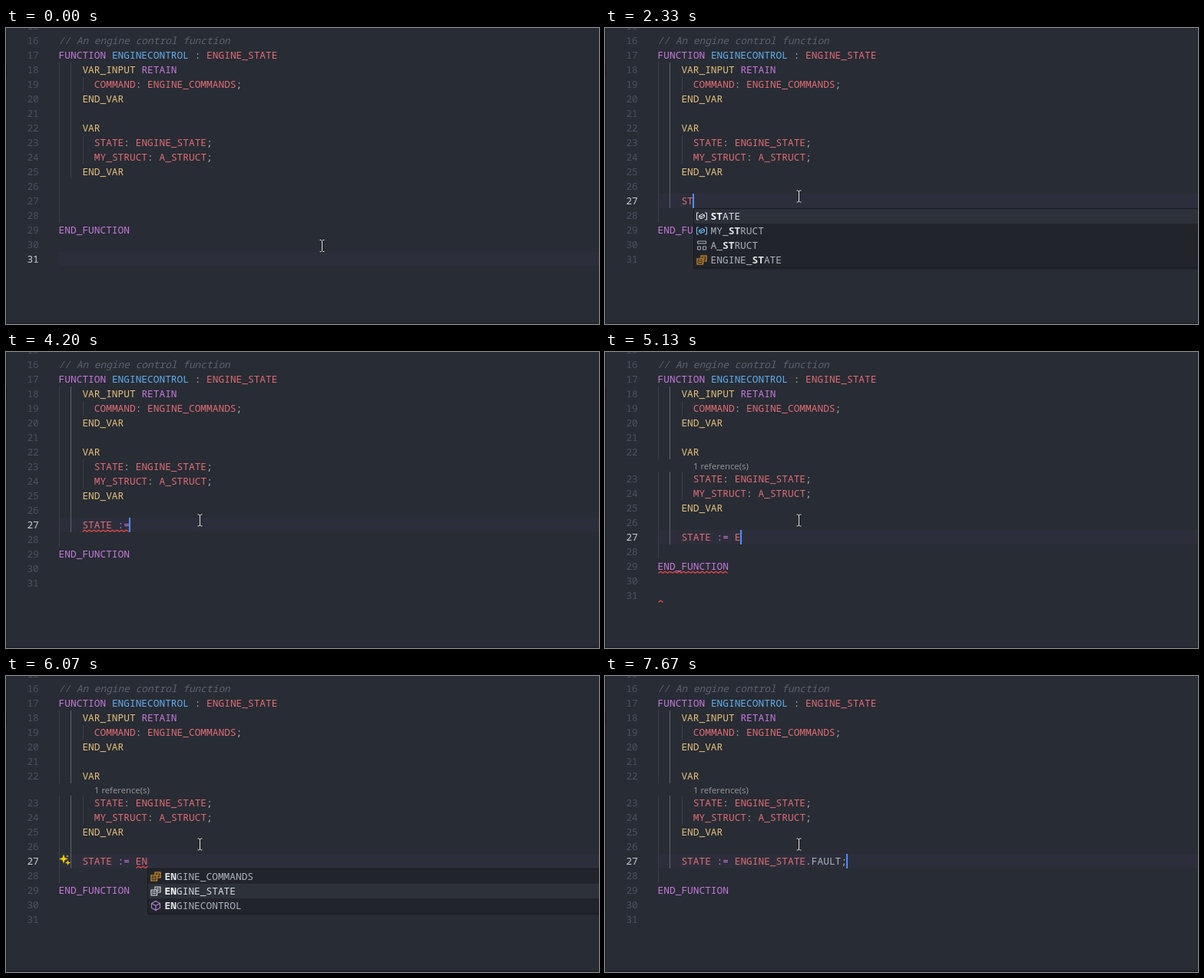
These frames come from a looping animation (772x386 px, 8000 ms). An HTML page:

```html
<!DOCTYPE html>
<html lang="en">
<head>
<meta charset="utf-8">
<title>Structured Text editor</title>
<style>
html, body { margin: 0; width: 100%; height: 100%; overflow: hidden; background: #282c34; }
svg { display: block; width: 772px; height: 386px; }
text { font: 12.833px "Noto Sans Mono", monospace; white-space: pre; }
.lens { font: 11.3px "Open Sans", sans-serif; }
</style>
</head>
<body>
<svg id="stage" viewBox="0 0 772 386">
  <rect width="772" height="386" fill="#282c34"/>
  <g id="editor"></g>
  <g id="mouse" fill="none">
    <path d="M-3 -7.5H-1L0 -6.5L1 -7.5H3M0 -6.5V6.5M-3 7.5H-1L0 6.5L1 7.5H3" stroke="#111" stroke-width="2.4" opacity=".6"/>
    <path d="M-3 -7.5H-1L0 -6.5L1 -7.5H3M0 -6.5V6.5M-3 7.5H-1L0 6.5L1 7.5H3" stroke="#eee" stroke-width="1"/>
  </g>
</svg>
<script>
const LOOP = 8000, CHAR = 7.7, LEFT = 68.6, ROW = 19;
const FG = '#abb2bf', RED = '#e06c75', PURPLE = '#c678dd', BLUE = '#61afef',
      YELLOW = '#e5c07b', GREY = '#5c6370';

// line number -> [column, colour, text] pieces
const CODE = {
  16: [[0, GREY, '// An engine control function', 'font-style="italic"']],
  17: [[0, PURPLE, 'FUNCTION'], [9, BLUE, 'ENGINECONTROL'], [23, FG, ':'], [25, RED, 'ENGINE_STATE']],
  18: [[4, YELLOW, 'VAR_INPUT'], [14, PURPLE, 'RETAIN']],
  19: [[6, RED, 'COMMAND'], [13, FG, ':'], [15, RED, 'ENGINE_COMMANDS'], [30, FG, ';']],
  20: [[4, YELLOW, 'END_VAR']],
  22: [[4, YELLOW, 'VAR']],
  23: [[6, RED, 'STATE'], [11, FG, ':'], [13, RED, 'ENGINE_STATE'], [25, FG, ';']],
  24: [[6, RED, 'MY_STRUCT'], [15, FG, ':'], [17, RED, 'A_STRUCT'], [25, FG, ';']],
  25: [[4, YELLOW, 'END_VAR']],
  29: [[0, PURPLE, 'END_FUNCTION']]
};

const KIND = {
  STATE: 'variable', MY_STRUCT: 'variable', COMMAND: 'variable',
  A_STRUCT: 'struct', ENGINE_COMMANDS: 'enum', ENGINE_STATE: 'enum', ENGINECONTROL: 'method',
  FAULT: 'member', RUNNING: 'member', STOPPED: 'member'
};
const TINT = { variable: '#75beff', struct: FG, enum: '#ee9d28', method: '#b180d7', member: '#75beff' };

const popup = (x, names, match = '', sel = 0) => ({ x, names: names.split(' '), match, sel });
const ENGINES = 'ENGINE_COMMANDS ENGINE_STATE ENGINECONTROL';
const SYNTAX = [[29, 0, 12], [31, 0, 1]];
const under = (from, to) => [[27, from, to]];

const START = { line: 31, col: 0, text: '', caret: false, deep: false, lens: false, marks: [], pop: null, bulb: false };
const EVENTS = [
  [670, { line: 27, caret: true }],
  [1130, { caret: false }],
  [1270, { col: 2, caret: true }],
  [1600, { col: 4 }],
  [2130, { text: 'S', deep: true }],
  [2270, { text: 'ST' }],
  [2330, { pop: popup(115, 'STATE MY_STRUCT A_STRUCT ENGINE_STATE', 'ST') }],
  [2400, { text: 'STA', marks: under(4, 6) }],
  [2470, { text: 'STAT', pop: popup(115, 'STATE ENGINE_STATE', 'STAT') }],
  [2670, { text: 'STATE' }],
  [2730, { marks: under(4, 9), pop: popup(138, 'STATE ENGINE_STATE', 'STATE') }],
  [3130, { caret: false }],
  [3270, { pop: null }],
  [3600, { text: 'STATE ', caret: true }],
  [3870, { text: 'STATE :' }],
  [3930, { marks: under(4, 11), pop: popup(153, 'COMMAND MY_STRUCT STATE ' + ENGINES) }],
  [4200, { text: 'STATE :=', marks: under(4, 12), pop: null }],
  [4270, { marks: SYNTAX }],
  [4600, { text: 'STATE := ' }],
  [4670, { lens: true }],
  [5130, { text: 'STATE := E' }],
  [5270, { text: 'STATE := EN' }],
  [5330, { pop: popup(184, ENGINES, 'EN') }],
  [5400, { marks: under(13, 14) }],
  [5600, { marks: under(13, 15) }],
  [5800, { caret: false }],
  [6000, { bulb: true }],
  [6070, { pop: popup(184, ENGINES, 'EN', 1) }],
  [6270, { caret: true }],
  [6400, { text: 'STATE := ENGINE_STATE', pop: null }],
  [6530, { marks: under(13, 25) }],
  [6670, { text: 'STATE := ENGINE_STATE.' }],
  [6870, { pop: popup(269, 'FAULT RUNNING STOPPED') }],
  [7200, { text: 'STATE := ENGINE_STATE.FAULT', pop: null }],
  [7530, { text: 'STATE := ENGINE_STATE.FAULT;' }],
  [7600, { marks: [] }],
  [7670, { bulb: false }]
];

const colX = n => LEFT + CHAR * n;
const rect = (x, y, w, h, fill, extra = '') => `<rect x="${x}" y="${y}" width="${w}" height="${h}" fill="${fill}" ${extra}/>`;
const text = (x, y, fill, str, extra = '') => `<text x="${x.toFixed(2)}" y="${y}" fill="${fill}" ${extra}>${str}</text>`;
const path = (d, stroke, width = 1, extra = '') => `<path d="${d}" fill="none" stroke="${stroke}" stroke-width="${width}" ${extra}/>`;

function tokens(str) {
  const dot = str.indexOf('.');
  return [...str.matchAll(/:=?|\w+|[.;]/g)].map(m => {
    const colour = m[0][0] === ':' ? PURPLE : dot >= 0 && m.index >= dot ? FG : RED;
    return [4 + m.index, colour, m[0]];
  });
}

function squiggle(from, to, top) {
  const end = Math.round(colX(to));
  let x = Math.round(colX(from)) + 0.5, d = `M${x} ${top + 18.3}`;
  for (let up = true; x + 3 <= end + 1; up = !up) d += `L${x += 3} ${top + (up ? 16.3 : 18.3)}`;
  return path(d, '#f44747', 1.2);
}

function icon(kind, x, y, c) {
  const at = `transform="translate(${x} ${y})"`;
  if (kind === 'variable')
    return path('M-4 -4.5H-6.5V4.5H-4M4 -4.5H6.5V4.5H4M-3.5 -.7L1 -3L3.5 -1.5V1L-1 3.2L-3.5 1.8ZM-3.5 -.7L-1 .6L3.5 -1.5M-1 .6V3.2', c, 1, at);
  if (kind === 'method')
    return path('M0 -6L5.5 -3V3L0 6L-5.5 3V-3ZM-5.5 -3L0 0L5.5 -3M0 0V6', c, 1.1, at);
  if (kind === 'struct')
    return path('M-5.5 -5.5H5.5V-2.5H-5.5ZM-5.5 1.5H-1.5V5.5H-5.5ZM1.5 1.5H5.5V5.5H1.5Z', c, 1, at);
  if (kind === 'member')
    return path('M-1.5 -4.5H6V2H2M-6 -1.5H1.5V4.5H-6ZM-4 1.5H0M1 -2H4', c, 1, at);
  return path('M-1 -1.5V-5.5H6V1.5H2.5M1 -3.5H4.5M2 -1.2H4.5M-6 -1.5H1.5V5.5H-6ZM-4.5 .8H0M-4.5 3H0', c, 1.1, at);
}

function drawPopup({ x, names, match, sel }, top) {
  const h = names.length * ROW;
  let out = rect(x + 1, top + 3, 772 - x, h + 1, '#000', 'opacity=".18"')
    + rect(x + 0.5, top + 0.5, 800, h + 1, '#21252b', 'stroke="#181a1f"');
  names.forEach((name, i) => {
    const y = top + 1 + i * ROW, on = i === sel, base = on ? '#d7dae0' : FG, kind = KIND[name];
    const at = match ? name.indexOf(match) : -1;
    if (on) out += rect(x + 1, y, 772 - x, ROW, '#2c313a');
    out += icon(kind, x + 11, y + 9.5, on ? '#e4e6ea' : TINT[kind]);
    const put = (from, str, fill, extra) => str ? text(x + 22.6 + from * CHAR, y + 14, fill, str, extra) : '';
    if (at < 0) out += put(0, name, base);
    else out += put(0, name.slice(0, at), base)
      + put(at, match, on ? '#fff' : '#e6e8ec', 'font-weight="700" style="font-weight:700"')
      + put(at + match.length, name.slice(at + match.length), base);
  });
  return out;
}

function sparkle(x, y, r) {
  const q = r * 0.27;
  return `<path fill="#ffcc00" d="M${x} ${y - r}L${x + q} ${y - q}L${x + r} ${y}L${x + q} ${y + q}L${x} ${y + r}L${x - q} ${y + q}L${x - r} ${y}L${x - q} ${y - q}Z"/>`;
}

function draw(s) {
  const top = n => 45 + (n - 18) * ROW + (s.lens && n > 22 ? 16 : 0);
  const here = top(s.line);
  let out = rect(69, here, 703, 18.5, '#2c2f3b');

  for (let n = 18; n <= 28; n++) {
    const bar = (x, lit) => rect(x, top(n), 1, ROW, lit ? '#5f636b' : '#3b4048');
    out += bar(69, s.line === 27 && !s.deep);
    if (n <= (s.deep ? 27 : 25)) out += bar(84, s.deep);
    if (n === 19 || n === 23 || n === 24) out += bar(100, false);
  }

  for (let n = 15; n <= 31; n++) {
    const y = top(n) + 14;
    out += text(27.4, y, n === s.line ? '#c8ccd4' : '#495162', n);
    const parts = n === 27 ? tokens(s.text) : CODE[n] || [];
    for (const [col, fill, str, style = ''] of parts)
      out += text(colX(col), y, fill, str, style.includes('italic') ? 'style="font-style:italic"' : '');
  }

  if (s.lens) out += text(115, 153, '#999', '1 reference(s)', 'class="lens"');
  for (const [n, from, to] of s.marks) out += squiggle(from, to, top(n));
  if (s.bulb) out += sparkle(75, here + 6.5, 6) + sparkle(80.5, here + 11.5, 3.6) + sparkle(80, here + 3, 1.8);
  if (s.caret) {
    const x = Math.max(69, Math.floor(68.4 + CHAR * (s.col + s.text.length)));
    out += rect(x, here, 2, ROW, '#528bff');
  }
  if (s.pop) out += drawPopup(s.pop, here + ROW);
  return out + rect(0, 0, 1, 386, '#21252b') + rect(0, 45, 1, ROW, '#181a1f') + rect(0, 384, 772, 2, '#21252b');
}

const editor = document.getElementById('editor');
const mouse = document.getElementById('mouse');
let shown = -1;

function render(t) {
  const count = EVENTS.filter(e => e[0] <= t).length;
  if (count !== shown) {
    shown = count;
    editor.innerHTML = draw(Object.assign({}, START, ...EVENTS.slice(0, count).map(e => e[1])));
  }
  // the pointer advances in seven steps at 15 per second
  const k = Math.max(0, Math.min(7, Math.floor((t + 1) / 66.9))) / 7;
  const p = k * k * (3 - 2 * k);
  mouse.setAttribute('transform', `translate(${(411.5 - 159 * p).toFixed(1)} ${(284 - 64.5 * p).toFixed(1)})`);
}

const begin = performance.now();
function tick() {
  render((performance.now() - begin) % LOOP);
  requestAnimationFrame(tick);
}
tick();
</script>
</body>
</html>
```
